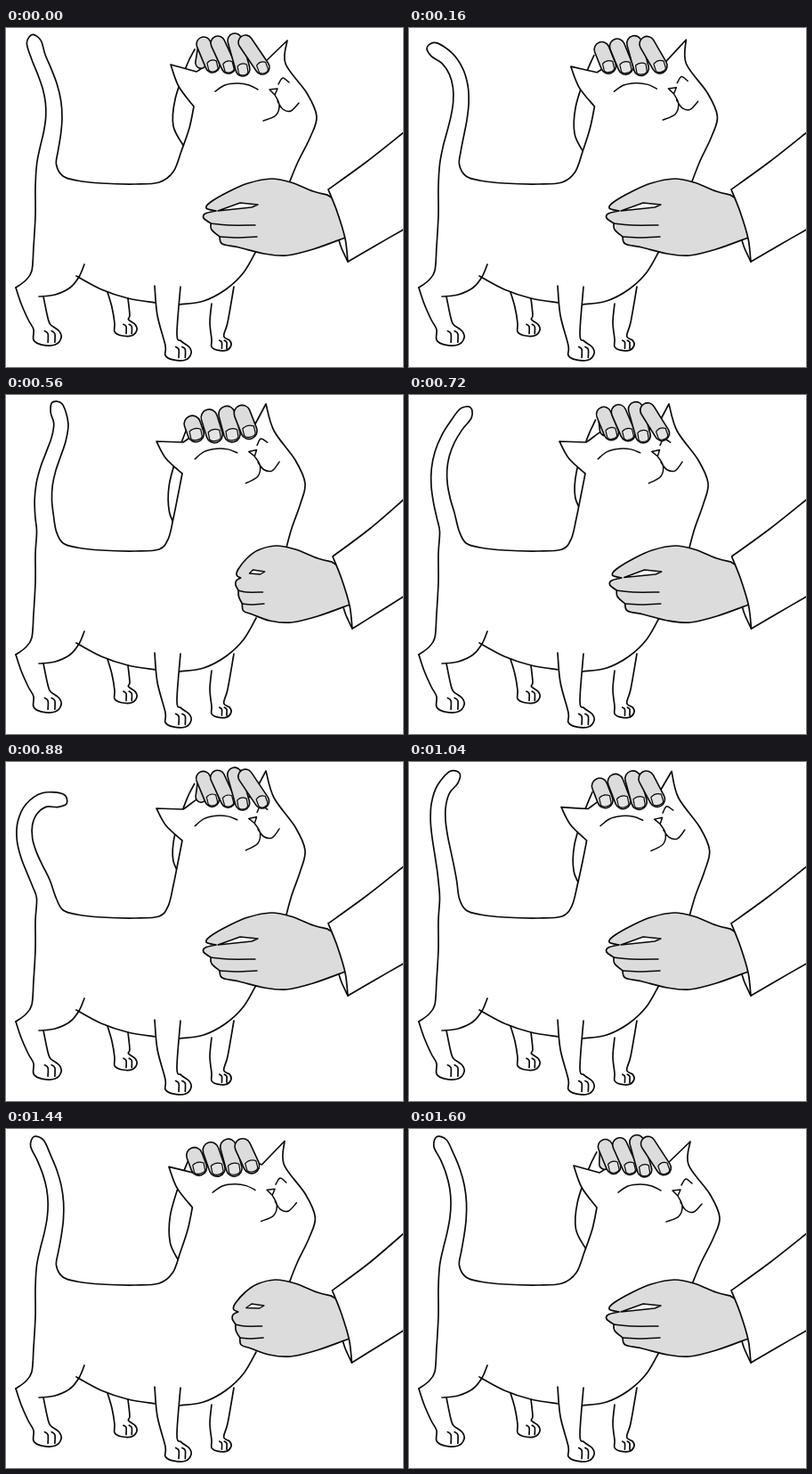
Write an HTML page that moves like this. It is 446 by 380 pixels and loops after 1680 ms.

```html
<!DOCTYPE html>
<html lang="en">
<head>
<meta charset="utf-8">
<title>Petting a cat</title>
<style>
html, body { margin: 0; width: 100%; height: 100%; overflow: hidden; background: #fff; }
svg { display: block; width: 446px; height: 380px; }
path { fill: none; stroke: #0a0a0a; stroke-width: 1.7; stroke-linecap: round; stroke-linejoin: round; }
</style>
</head>
<body>
<svg id="stage" viewBox="0 0 446 380"></svg>
<script>
const STEP = 80, COUNT = 21, GREY = '#dcdcdc';
const stage = document.getElementById('stage');

const pts = s => s.split(' ').map(p => p.split(',').map(Number));
const lerp = (a, b, k) => a + (b - a) * k;
const clamp = v => Math.min(1, Math.max(0, v));
const ease = v => (v = clamp(v), v * v * (3 - 2 * v));
const blend = (a, b, k) => a.map((p, i) => [lerp(p[0], b[i][0], k), lerp(p[1], b[i][1], k)]);

function add(style = {}, d = '') {
  const el = document.createElementNS('http://www.w3.org/2000/svg', 'path');
  Object.assign(el.style, style);
  el.setAttribute('d', d);
  stage.appendChild(el);
  return el;
}

// Smooth curve through the points, without the leading move
function curve(p) {
  let d = '';
  for (let i = 0; i < p.length - 1; i++) {
    const a = p[i - 1] || p[i], b = p[i], c = p[i + 1], e = p[i + 2] || c;
    const n = [b[0] + (c[0] - a[0]) / 6, b[1] + (c[1] - a[1]) / 6,
               c[0] - (e[0] - b[0]) / 6, c[1] - (e[1] - b[1]) / 6, c[0], c[1]];
    d += 'C' + n.map(v => v.toFixed(2)).join(' ');
  }
  return d;
}
// Curves joined at sharp corners
const join = (...runs) => 'M' + runs[0][0].join(' ') + runs.map(curve).join('');
const poly = p => 'M' + p.map(q => q.join(' ')).join('L') + 'Z';

// Motion rules: f counts steps within the loop
const headTurn = f => ease(f / 7) * (1 - ease((f - 11) / 9));
const stroke = f => (1 - Math.cos(f / 10.5 * 2 * Math.PI)) / 2;
const gripAt = f => {
  const q = f % 10.5;
  return ease((q - 3.8) / .9) * (1 - ease((q - 7) / 2.5));
};

// Tail: lean in degrees at four stations, from base to tip
const SWAY = [[0, 5, 5, -19, -10], [4, 5, 19, -8, -130], [7, -7, 6, 20, -36], [11, -14, -22, 20, 115],
              [15, 3, 1, -19, -3], [18, 7, 8, -14, -25], [20, 7, 8, -13, -28], [21, 5, 5, -19, -10]];

function tailEdge(f) {
  const i = SWAY.findIndex(k => k[0] > f) - 1, a = SWAY[i], b = SWAY[i + 1];
  const k = ease((f - a[0]) / (b[0] - a[0]));
  const [p, q, r, s] = a.slice(1).map((v, j) => lerp(v, b[j + 1], k) * Math.PI / 180);
  const lean = u => -p * (u - 1) * (u - 2) * (u - 3) / 6 + q * u * (u - 2) * (u - 3) / 2 -
                    r * u * (u - 1) * (u - 3) / 2 + s * u * (u - 1) * (u - 2) / 6;
  const left = [], right = [], N = 8, seg = 142 / N;
  let x = 45.5, y = 153;
  for (let j = 0; j <= N; j++) {
    const t = j ? lean(3 * j / N) : 0, w = 8 + 3 * (1 - j / N) ** 2;
    left.push([x - w * Math.cos(t), y - w * Math.sin(t)]);
    right.unshift([x + w * Math.cos(t), y + w * Math.sin(t)]);
    const next = j < N ? lean(3 * (j + .5) / N) : t, len = j < N ? seg : 8;
    x += len * Math.sin(next);
    y -= len * Math.cos(next);
  }
  return [...left, [x, y], ...right];
}

const RUMP = pts('11,291 22,283 29,272 31,245 33,210 33,178');
const SPINE = pts('64,166 80,171 107,174 145,175 172,173');
const NAPE = pts('188,161 197,138 206,112 211,88');
const CHEEK = pts('314,40 338,73 349,99 342,122 328,150 318,174');

function bodyPath(f, turn) {
  const warp = ([x, y]) => [x - 13 * turn * clamp((200 - y) / 90), y];
  const tip = (x, y, dx, dy) => warp([x, y]).map((v, i) => v + turn * [dx, dy][i]);
  const nape = NAPE.map(warp), earBase = nape[3];
  const earL = tip(185, 41, -3, 11), earR = tip(316, 14, -11, -4);
  const mid = [(earBase[0] + earL[0]) / 2 - 4, (earBase[1] + earL[1]) / 2 + 1];
  const top = tip(214, 49, -2, 4), root = warp([289, 40]);
  return join([...RUMP, ...tailEdge(f), ...SPINE, ...nape], [earBase, mid, earL], [earL, top],
    [top, warp([250, 30]), root], [root, earR], [earR, ...CHEEK.map(warp)]);
}

// One leg: front line, paw scaled to its width, back line
const PAW = pts('0,.38 .3,.55 .78,.55 1,.3 .92,.05 .62,-.17');
const TOE = pts('.4,.05 .52,.15 .52,.46');
function leg(front, back, w) {
  const f = pts(front), [x, y] = f[f.length - 1];
  const place = (p, dx = 0) => p.map(q => [x + (q[0] + dx) * w, y + q[1] * w]);
  add({}, join([...f, ...place(PAW), ...pts(back)]) + join(place(TOE)) + join(place(TOE, .25)));
}

const ARM_FRONT = pts('212,24 203,42 190,80 188,110 200,133');
const ARM_BACK = pts('199,45 190,72 181,108 182,138 190,157');

// Fingers of the upper hand: four roots, then four tips
const FRONT = pts('222,18 238,17 257,14 269,16 232,42 250,43 266,46 288,44');
const BACK = pts('205,37 225,28 245,24 264,22 207,44 229,45 250,43 268,39');

const FACE = ['235,71 246,64 260,62 273,64 283,69', '306,63 311,56 318,61',
              '302,75 307,86 303,98 289,104', '305,82 311,91 320,93 329,84'].map(pts);
const NOSE = pts('296,69 305,68 302,75');

const HAND = ['361,187 345,183 320,173 298,169 272,174 251,183 230,195 225,202 236,205',
              '236,205 224,208 222,213 230,219', '230,219 231,226 240,234',
              '240,234 243,242 262,246 290,253 315,255 345,248 381,235',
              '381,235 390,210 361,187'].map(pts);
const CREASES = ['230,219 250,221 280,221', '240,234 260,235 282,234'].map(pts);
const GAP = pts('238,205 263,196 283,198 276,201');
const SLEEVE = ['448,116 405,150 362,181', '362,181 372,206 381,236 384,262',
                '384,262 415,244 448,225'].map(pts);
const CUFF = pts('374,238 377,247 384,262');

const arm = add();
const body = add({ fill: '#fff' });
leg('11,291 17,309 25,327 31,338', '47,325 42,301', 31);
leg('114,296 119,313 122,331', '139,322 137,303', 25);
leg('167,289 170,322 179,356', '192,343 196,290', 29);
leg('231,309 229,330 231,349', '249,330 256,290', 22);
for (const line of ['37,301 55,299 72,291 82,279 88,265', '79,278 107,293 137,303 168,308',
                    '195,310 222,306 247,293 267,274 281,250']) add({}, join(pts(line)));
const face = add({ strokeWidth: 1.5 }, FACE.map(p => join(p)).join('') + poly(NOSE));
const hand = add({ fill: GREY });
const creases = add({ strokeWidth: 1.5 });
const gap = add({ fill: '#fff', strokeWidth: 1.4 });
const sleeve = add({ fill: '#fff' });
const cuff = add();

const digit = () => ({ edge: add(), skin: add({ stroke: GREY }) });
const side = digit();
const digits = [0, 1, 2, 3].map(() =>
  Object.assign(digit(), { nail: add({ fill: '#e4e4e4', strokeWidth: 1.2 }) }));

function drawDigit(d, a, b, r) {
  const line = `M${a.join(' ')}L${b.join(' ')}`;
  d.edge.setAttribute('d', line);
  d.skin.setAttribute('d', line);
  d.edge.style.strokeWidth = 2 * r;
  d.skin.style.strokeWidth = 2 * r - 3.2;
  if (!d.nail) return;
  const turn = Math.atan2(a[0] - b[0], b[1] - a[1]) * 180 / Math.PI * .6;
  const w = r - 3.5;
  d.nail.setAttribute('d', `M${-w} -4Q0 -8 ${w} -4L${w} 4Q${w - 1} 7 0 7Q${1 - w} 7 ${-w} 4Z`);
  d.nail.setAttribute('transform', `translate(${b.join(' ')}) rotate(${turn})`);
}

function draw(f) {
  const turn = headTurn(f), back = stroke(f), grip = gripAt(f);

  arm.setAttribute('d', join(blend(ARM_FRONT, ARM_BACK, back)));
  body.setAttribute('d', bodyPath(f, turn));
  face.setAttribute('transform',
    `translate(${-23 * turn} ${-6 * turn}) rotate(${-6 * turn} 300 72)`);

  // Curling pulls the fingers in and nudges the wrist along
  const fold = p => p.map(([x, y]) =>
    [x + grip * (5 * clamp((448 - x) / 60) + 31 * clamp((300 - x) / 78) ** 1.6), y]);
  hand.setAttribute('d', join(...HAND.map(fold)));
  creases.setAttribute('d', CREASES.map(p => join(fold(p))).join(''));
  const [inner, ...rest] = fold(GAP);
  gap.setAttribute('d', poly([[inner[0] + 9 * grip, inner[1] - 5 * grip], ...rest]));
  sleeve.setAttribute('d', join(...SLEEVE.map(fold)));
  cuff.setAttribute('d', join(fold(CUFF)));

  const p = blend(FRONT, BACK, back), r = lerp(8.8, 10.3, back);
  drawDigit(side, [p[0][0], p[0][1] + 3], [lerp(219, p[4][0], back), p[4][1] - 3], 7);
  digits.forEach((d, i) => drawDigit(d, p[i], p[i + 4], r));
}

let start, shown = -1;
function tick(now) {
  start ??= now;
  const f = Math.floor((now - start) / STEP) % COUNT;
  if (f !== shown) draw(shown = f);
  requestAnimationFrame(tick);
}
draw(0);
requestAnimationFrame(tick);
</script>
</body>
</html>
```
